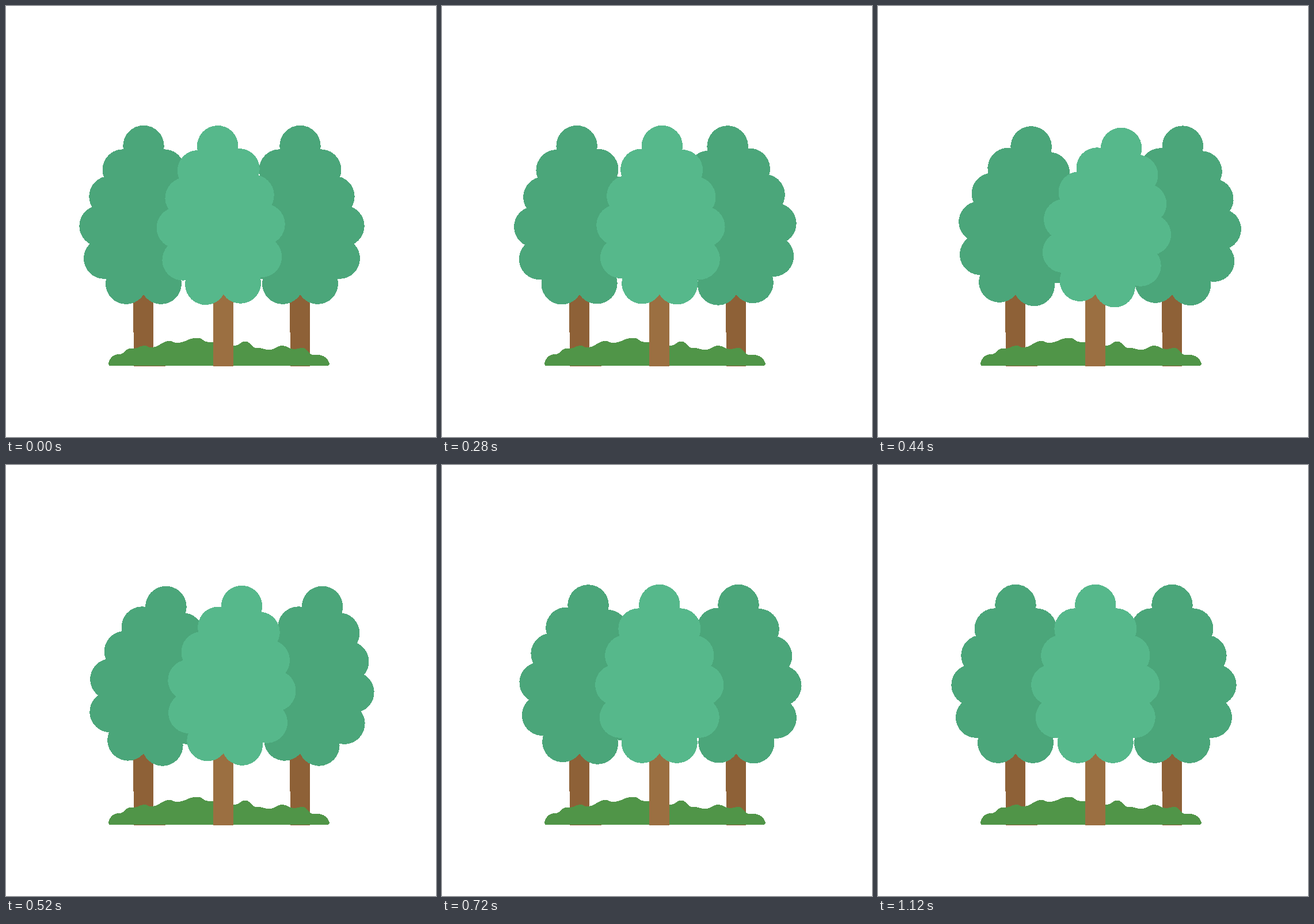
Animation, 747 px wide and 750 px high, one loop 1160 ms. Source, as an HTML page:

```html
<!DOCTYPE html>
<html lang="en">
<head>
<meta charset="utf-8">
<title>Swaying trees</title>
<style>
  html, body { margin: 0; width: 100%; height: 100%; overflow: hidden; background: #fff; }
  svg { display: block; width: 100%; height: 100%; shape-rendering: crispEdges; }
</style>
</head>
<body>
<svg viewBox="0 0 747 750">
  <defs>
    <g id="crown"></g>
    <path id="trunk" d="M-18 490H17V627H-17V568H-18Z"/>
  </defs>
  <g fill="#8e6137">
    <use href="#trunk" x="239"/>
    <use href="#trunk" x="511"/>
    <path d="M222 625H277V627H222Z"/>
  </g>
  <path id="grass" fill="#509548"/>
  <use id="left" href="#crown" fill="#4ba67a"/>
  <use id="right" href="#crown" fill="#4ba67a"/>
  <path fill="#9b6f41" d="M360 490H395V627H360Z"/>
  <use id="middle" href="#crown" fill="#56b88b"/>
</svg>
<script>
  const LOOP = 1160, STEP = 40, LOW = -4.1, PIVOT_Y = 502.5;
  const byId = id => document.getElementById(id);

  // Right-hand leaf circles from the top down, relative to the pivot; the left side mirrors them.
  const leaves = [[0, -259], [35.8, -217.5], [59, -171], [76, -119.7], [68.3, -63.3], [30.3, -19.3]];
  const outline = [...leaves, ...leaves.map(([x, y]) => [-x, y]).reverse()];
  byId('crown').innerHTML = `<polygon points="${outline.join(' ')}"/>` +
    outline.map(([x, y]) => `<circle cx="${x}" cy="${y}" r="35.7"/>`).join('');

  // Crests and hollows of the grass, joined by waves that are level at each point.
  const hills = [[196, 606], [217, 596], [222, 596], [240, 591], [252, 594], [285, 583], [296, 586],
    [333, 577.5], [352, 585], [398, 591], [415, 583.5], [436, 595], [458, 598], [480, 591],
    [500, 597], [515, 595], [534, 607], [542, 607]];
  const waves = hills.slice(1).map(([x, y], i) => {
    const [fromX, fromY] = hills[i], mid = (fromX + x) / 2;
    return `C${mid} ${fromY} ${mid} ${y} ${x} ${y}`;
  });
  byId('grass').setAttribute('d',
    `M181 626Q178 626 178 622Q182 606 ${hills[0]}${waves.join('')}Q557 608 562 622Q562 626 558 626Z`);

  const smooth = u => u * u * (3 - 2 * u);
  const speedUp = u => u ** 1.25;
  const slowDown = u => 1 - (1 - u) ** 2;

  // Each tree leans back until dip, swings over until peak and stands up again at rest (ms).
  const trees = [
    { id: 'left', x: 239, start: 0, dip: 146, peak: 583, rest: 812, high: 9.4, rise: smooth, fall: smooth },
    { id: 'right', x: 511, start: 0, dip: 250, peak: 548, rest: 792, high: 10.2, rise: speedUp, fall: slowDown },
    { id: 'middle', x: 377.8, start: -182, dip: 160, peak: 456, rest: 631, high: 10.1, rise: smooth, fall: smooth }
  ];

  const progress = (t, from, to) => Math.min(1, Math.max(0, (t - from) / (to - from)));

  function leanAt({ start, dip, peak, rest, high, rise, fall }, t) {
    return LOW * smooth(progress(t, start, dip)) +
      (high - LOW) * rise(progress(t, dip, peak)) -
      high * fall(progress(t, peak, rest));
  }

  function draw(time) {
    const t = Math.floor((time % LOOP) / STEP) * STEP;
    for (const tree of trees) {
      byId(tree.id).setAttribute('transform',
        `translate(${tree.x} ${PIVOT_Y}) rotate(${leanAt(tree, t)})`);
    }
  }

  const begin = performance.now();
  function tick() {
    draw(performance.now() - begin);
    requestAnimationFrame(tick);
  }
  tick();
</script>
</body>
</html>
```
